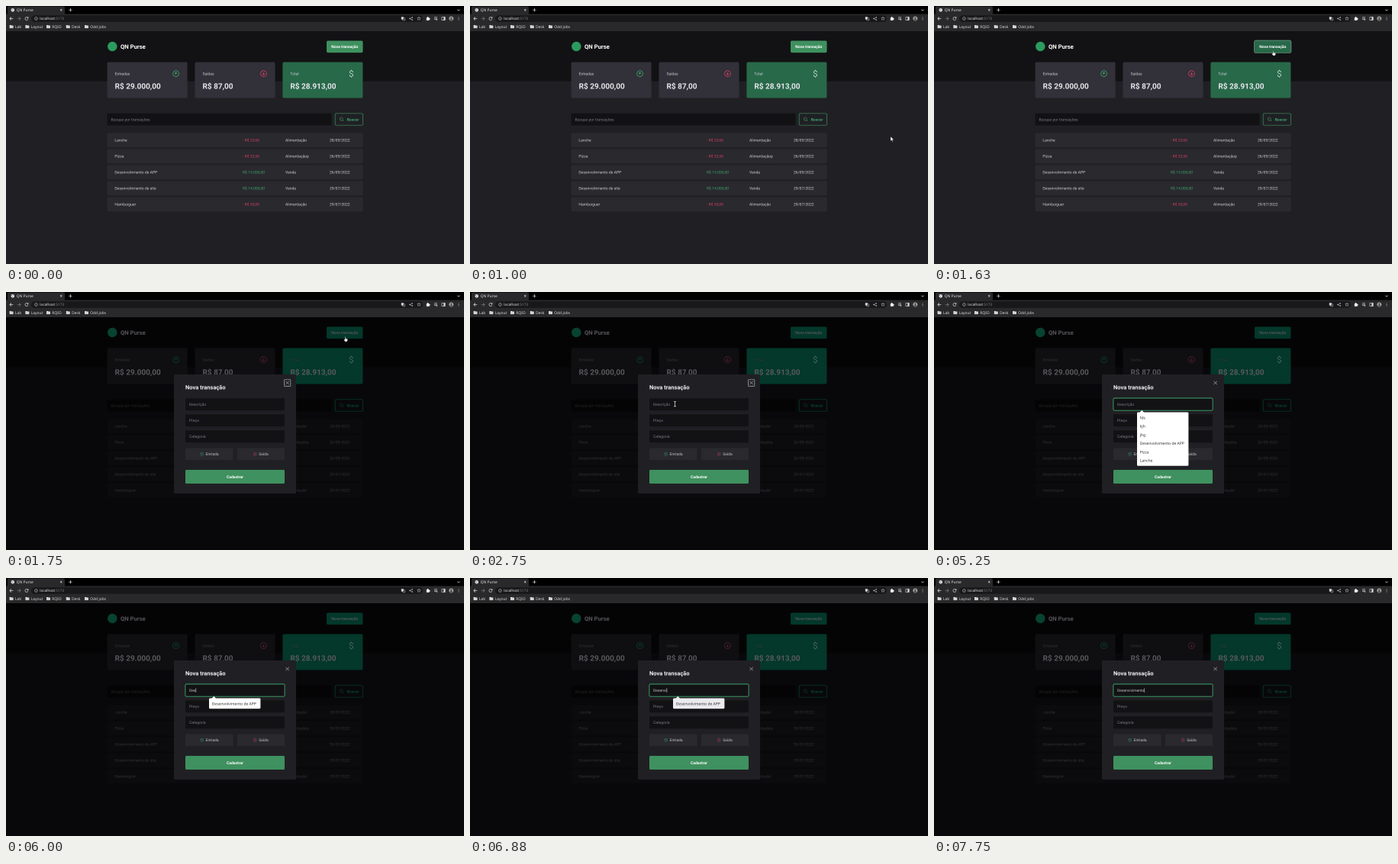
These frames come from a looping animation (600 by 338 pixels, 8000 ms). An HTML page with a canvas:

```html
<!DOCTYPE html>
<html lang="pt-BR">
<head>
<meta charset="utf-8">
<title>QN Purse</title>
<style>
html, body { margin: 0; width: 100%; height: 100%; overflow: hidden; background: #000; }
canvas { display: block; width: 600px; height: 338px; }
</style>
</head>
<body>
<canvas id="stage"></canvas>
<script>
const LOOP = 8000, STEP = 125, SCALE = 2;
const canvas = document.getElementById('stage');
canvas.width = 600 * SCALE;
canvas.height = 338 * SCALE;
const ctx = canvas.getContext('2d');
ctx.textRendering = 'geometricPrecision';
const ROBOTO = 'Roboto, sans-serif', NOTO = '"Noto Sans", sans-serif';

const LIGHT = {
  top: '#121214', body: '#202024', card: '#323038', row: '#29292e', field: '#121214',
  total: '#28694a', button: '#3f915f', hover: '#28694a', text: '#d2d2d8', strong: '#e6e6ea',
  title: '#ffffff', hint: '#7c7c8a', green: '#3fa56d', red: '#cf4260', logo: '#2c9a5e',
  outline: '#3f915f', dollar: '#ffffff'
};
const DIM = {
  top: '#040405', body: '#08080a', card: '#0f0f11', row: '#0b0b0d', field: '#040405',
  total: '#03382a', button: '#03382a', hover: '#03382a', text: '#343437', strong: '#58585c',
  title: '#55555a', hint: '#27272b', green: '#0a4030', red: '#55202a', logo: '#07432f',
  outline: '#07402e', dollar: '#6c7d76'
};

const ROWS = [
  ['Lanche', '- R$ 25,00', 'Alimentação', '28/09/2022'],
  ['Pizza', '- R$ 32,00', 'Alimentaçãop', '26/09/2022'],
  ['Desenvolvimento de APP', 'R$ 15.000,00', 'Venda', '26/09/2022'],
  ['Desenvolvimento de site', 'R$ 14.000,00', 'Venda', '29/07/2022'],
  ['Hamburguer', '- R$ 30,00', 'Alimentação', '29/07/2022']
];
const HINTS = ['fds', 'kjh', 'jhg', 'Desenvolvimento de APP', 'Pizza', 'Lanche'];

// Step at which each letter is typed
const TYPED = 'Desenvivimento';
const KEYS = [44, 47, 48, 49, 51, 53, 55, 56, 57, 58, 59, 60, 61, 62];

function box(x, y, w, h, fill, r = 0, stroke, line = 0.6) {
  ctx.beginPath();
  ctx.roundRect(x, y, w, h, r);
  if (fill) { ctx.fillStyle = fill; ctx.fill(); }
  if (stroke) { ctx.strokeStyle = stroke; ctx.lineWidth = line; ctx.stroke(); }
}

function text(str, x, y, color, size = 5, weight = 400, family = ROBOTO, align = 'left') {
  ctx.font = `${weight} ${size}px ${family}`;
  ctx.textAlign = align;
  ctx.textBaseline = 'alphabetic';
  ctx.fillStyle = color;
  ctx.fillText(str, x, y + size * 0.355);
}

function lines(color, width, ...paths) {
  ctx.strokeStyle = color;
  ctx.lineWidth = width;
  ctx.beginPath();
  for (const p of paths) {
    for (let i = 0; i < p.length; i += 2) ctx[i ? 'lineTo' : 'moveTo'](p[i], p[i + 1]);
  }
  ctx.stroke();
}

function shape(points, fill, stroke) {
  ctx.beginPath();
  for (let i = 0; i < points.length; i += 2) ctx.lineTo(points[i], points[i + 1]);
  ctx.closePath();
  ctx.fillStyle = fill;
  ctx.fill();
  if (stroke) { ctx.strokeStyle = stroke; ctx.lineWidth = 0.4; ctx.stroke(); }
}

function disc(x, y, r, fill) {
  ctx.beginPath();
  ctx.arc(x, y, r, 0, 7);
  ctx.fillStyle = fill;
  ctx.fill();
}

function ring(x, y, r, color, width = 0.6, from = 0, to = Math.PI * 2) {
  ctx.beginPath();
  ctx.arc(x, y, r, from, to);
  ctx.strokeStyle = color;
  ctx.lineWidth = width;
  ctx.stroke();
}

const cross = (x, y, r, color, width) =>
  lines(color, width, [x - r, y - r, x + r, y + r], [x - r, y + r, x + r, y - r]);

// Circled arrow; dir is -1 for up and 1 for down
function arrowIcon(x, y, r, dir, color) {
  const a = r * 0.42, tip = y + dir * a;
  ring(x, y, r, color, r * 0.2);
  lines(color, r * 0.2, [x, y - dir * a, x, tip], [x - a, tip - dir * a, x, tip, x + a, tip - dir * a]);
}

function browserIcons() {
  const c = '#d8d8da', dim = '#77777b', y = 16.5;
  lines(c, 0.7, [9.4, y, 4.9, y], [7, y - 2.1, 4.9, y, 7, y + 2.1]);
  lines(dim, 0.7, [14.7, y, 19.2, y], [17.1, y - 2.1, 19.2, y, 17.1, y + 2.1]);
  ring(27, y, 2, c, 0.7, 0.4, 5.6);
  shape([29.4, y - 2.4, 29.4, y - 0.2, 27.2, y - 0.2], c);
  ring(39.5, y, 1.9, c, 0.5);
  lines(c, 0.5, [39.5, y - 0.3, 39.5, y + 1], [39.5, y - 1.1, 39.5, y - 0.7]);

  box(517.8, y - 2.3, 3, 3.4, c, 0.4);
  box(519.8, y - 0.7, 3, 3.1, null, 0.4, c, 0.5);
  lines(c, 0.5, [532.2, y - 1.6, 529, y, 532.2, y + 1.6]);
  for (const [x, dy] of [[532.2, -1.6], [529, 0], [532.2, 1.6]]) disc(x, y + dy, 0.7, c);
  const star = [];
  for (let i = 0; i < 10; i++) {
    const r = i % 2 ? 1.1 : 2.4, a = i * Math.PI / 5;
    star.push(541 + r * Math.sin(a), y - r * Math.cos(a));
  }
  lines(c, 0.45, [...star, star[0], star[1]]);

  box(550.8, y - 1.4, 3.8, 3.8, '#f0f0f0', 0.4);
  disc(552.6, y - 1.6, 0.9, '#f0f0f0');
  disc(554.8, y + 0.4, 0.9, '#f0f0f0');
  lines(c, 0.6, [561, y - 1.7, 565, y - 1.7], [561, y - 0.3, 565, y - 0.3], [561, y + 1.1, 563, y + 1.1]);
  disc(564.3, y + 1.4, 0.9, c);
  box(570.9, y - 2.1, 4.4, 4.2, null, 0.4, c, 0.6);
  box(573.3, y - 2.1, 2, 4.2, c);
  disc(583.3, y, 3, '#a9a5a2');
  disc(583.3, y - 0.8, 1.1, '#4a4543');
  ctx.beginPath();
  ctx.arc(583.3, y + 2.2, 1.8, Math.PI, 0);
  ctx.fill();
  for (const dy of [-1.6, 0, 1.6]) disc(593, y + dy, 0.45, c);
}

function browser() {
  box(0, 0, 600, 33, '#000');
  box(2, 0.5, 75, 14, '#29292b', 2);
  box(0, 10.5, 600, 22.5, '#29292b');
  box(33, 12.3, 513, 8.6, '#18181a', 4.3);
  disc(8.8, 5.3, 2.3, '#e4e4e6');
  lines('#6a6a6e', 0.5, [7, 4.3, 8.7, 5, 8.2, 6.8], [9.6, 3.5, 10.4, 5.4]);
  text('QN Purse', 13.8, 5.3, '#e8e8ea', 4.9, 400, NOTO);
  cross(72.3, 5.2, 1.2, '#e0e0e2', 0.6);
  lines('#e8e8ea', 0.7, [82.2, 5.2, 86.6, 5.2], [84.4, 3, 84.4, 7.4]);
  lines('#e0e0e2', 0.6, [591.4, 4.6, 593, 6.1, 594.6, 4.6]);
  browserIcons();
  text('localhost', 44.3, 16.5, '#ececee', 4.7, 400, NOTO);
  const hostWidth = ctx.measureText('localhost').width;
  text(':5173', 44.3 + hostWidth, 16.5, '#8b8b90', 4.7, 400, NOTO);

  const folders = [[4.6, 'Lab'], [25.4, 'Layout'], [53, 'RQIO'], [78.8, 'Desk'], [103, 'Odd jobs']];
  for (const [x, name] of folders) {
    box(x, 25, 2.4, 2, '#d4d4d6', 0.4);
    box(x, 25.5, 5, 3.6, '#d4d4d6', 0.4);
    text(name, x + 7.3, 27.2, '#dcdcde', 4.9, 400, NOTO);
  }
}

function card(x, label, value, fill, p) {
  box(x, 73.5, 105, 47, fill, 1.9);
  text(label, x + 10, 88.8, p.text);
  text(value, x + 10, 104.9, p.strong, 10, 700);
}

function page(p, hover, ringed) {
  box(0, 33, 600, 305, p.body);
  box(0, 33, 600, 65.5, p.top);
  disc(139.3, 53, 6.2, p.logo);
  text('QN Purse', 150, 53.2, p.title, 7.7, 700);
  box(420, 45.5, 47.5, 15.6, hover ? p.hover : p.button, 1.9);
  if (ringed) box(419.6, 45.1, 48.3, 16.4, null, 2.1, '#8fc3a6', 0.6);
  text('Nova transação', 443.8, 53.4, p.title, 5, 700, ROBOTO, 'center');

  card(132.6, 'Entradas', 'R$ 29.000,00', p.card, p);
  card(247.5, 'Saídas', 'R$ 87,00', p.card, p);
  card(362.4, 'Total', 'R$ 28.913,00', p.total, p);
  arrowIcon(222.6, 88.6, 3.9, -1, p.green);
  arrowIcon(337.5, 88.6, 3.9, 1, p.red);
  text('$', 452.3, 88.7, p.dollar, 11, 300, ROBOTO, 'center');

  box(132.6, 140.6, 294, 15.8, p.field, 1.5);
  text('Busque por transações', 137.5, 148.6, p.hint);
  box(431.2, 140.8, 36.2, 15.4, null, 1.7, p.outline, 0.7);
  ring(439.2, 148, 2, p.green, 0.6);
  lines(p.green, 0.6, [440.7, 149.5, 442.1, 150.9]);
  text('Buscar', 446.6, 148.6, p.green, 5, 700);

  ROWS.forEach(([name, price, kind, date], i) => {
    const y = 166.4 + i * 21;
    box(132.6, y, 334.9, 18.8, p.row, 1.6);
    text(name, 142.4, y + 9.3, p.text);
    text(price, 310, y + 9.3, price[0] === '-' ? p.red : p.green);
    text(kind, 366, y + 9.3, p.text);
    text(date, 424, y + 9.3, p.text);
  });
}

function modal(k) {
  const focused = k >= 26;
  const count = KEYS.filter(key => key <= k).length;
  const value = TYPED.slice(0, count);
  box(220, 108, 160, 156, '#202024', 1.6);
  text('Nova transação', 235, 124.6, '#f2f2f4', 7.5, 700);
  cross(368.6, 119, 2.2, '#a5a5ae', 0.6);
  if (!focused) box(364.6, 114.8, 8.2, 8.6, null, 0.5, '#aab8b4', 0.7);

  ['Descrição', 'Preço', 'Categoria'].forEach((label, i) => {
    const y = 139.2 + i * 21;
    box(235, y, 130, 16, '#121214', 1.6);
    if (i || !count) text(label, 240, y + 8, '#7c7c8a');
  });
  if (focused) box(234.9, 139, 130.2, 16.2, null, 1.8, '#3fa56d', 0.9);
  if (count) text(value, 240, 147.2, '#c8c8d0');
  const caretOn = count || (k >= 26 && k < 30) || (k >= 35 && k < 40);
  if (caretOn) {
    ctx.font = '400 5px ' + ROBOTO;
    box(240.1 + ctx.measureText(value).width, 144.2, 0.5, 5.8, '#e6e6ea');
  }

  box(235, 204.5, 62.5, 15.8, '#29292e', 1.6);
  box(302.7, 204.5, 62.3, 15.8, '#29292e', 1.6);
  arrowIcon(256.6, 212.3, 2.1, -1, '#3fa56d');
  arrowIcon(326.2, 212.3, 2.1, 1, '#cf4260');
  text('Entrada', 261.5, 212.4, '#c4c4cc');
  text('Saída', 331.2, 212.4, '#c4c4cc');
  box(235, 233, 130, 18, '#3f915f', 1.6);
  text('Cadastrar', 300, 242, '#ffffff', 5, 700, ROBOTO, 'center');

  if (k >= 26 && k < 56) hints(count ? HINTS.slice(3, 4) : HINTS, k === 55 ? '#ebebef' : '#ffffff');
}

function hints(items, fill) {
  shape([269.2, 158, 272.3, 155, 275.4, 158], fill);
  box(266, 157.5, 67.4, items.length * 11.3 + 2.5, fill, 1.5);
  items.forEach((item, i) => text(item, 269.8, 164.7 + i * 11.25, '#2a2a2c', 4.95, 400, NOTO));
}

function arrowCursor(x, y) {
  shape([x, y, x, y + 6, x + 1.4, y + 4.8, x + 2.4, y + 7, x + 3.3, y + 6.6,
    x + 2.4, y + 4.5, x + 4.2, y + 4.4], '#fff', '#222');
}

function handCursor(x, y) {
  shape([x - 0.9, y - 2.5, x, y - 2.5, x + 0.2, y, x + 2.6, y + 0.6, x + 2.5, y + 2.4,
    x + 1.8, y + 4, x - 0.9, y + 4, x - 2.4, y + 1.4, x - 1.8, y + 0.8, x - 0.9, y + 1.6], '#fff', '#222');
}

function beamCursor(x, y) {
  lines('#f0f0f0', 0.7, [x, y - 3, x, y + 3],
    [x - 1.6, y - 3.3, x, y - 2.9, x + 1.6, y - 3.3], [x - 1.6, y + 3.3, x, y + 2.9, x + 1.6, y + 3.3]);
}

const ease = u => u * u * (3 - 2 * u);
function glide(k, from, to, a, b) {
  const u = ease(Math.min(1, Math.max(0, (k - from) / (to - from))));
  return [a[0] + (b[0] - a[0]) * u, a[1] + (b[1] - a[1]) * u];
}

function cursor(k) {
  if (k < 6 || k >= 42) return;
  if (k < 11) arrowCursor(...glide(k, 6, 12, [588, 210], [445, 59]));
  else if (k < 15) handCursor(...glide(k, 10, 12, [450, 66], [445, 61]));
  else if (k < 19) arrowCursor(...glide(k, 14, 20, [444, 59], [246, 149]));
  else beamCursor(...glide(k, 19, 24, [245.5, 149.3], [281, 145.4]));
}

function draw(time) {
  const k = Math.floor(time / STEP);
  const open = k >= 14;
  ctx.setTransform(SCALE, 0, 0, SCALE, 0, 0);
  page(open ? DIM : LIGHT, k >= 11, k === 13);
  browser();
  if (open) modal(k);
  cursor(k);
}

const start = performance.now();
function frame() {
  draw((performance.now() - start) % LOOP);
  requestAnimationFrame(frame);
}
frame();
</script>
</body>
</html>
```
